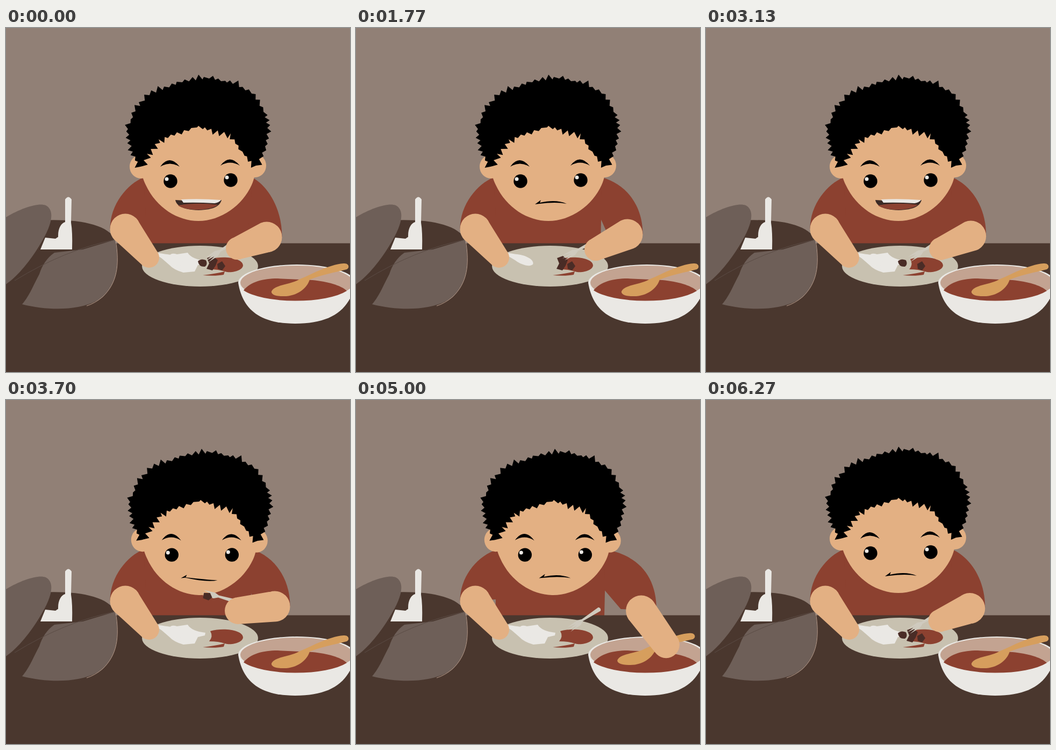
An HTML page that plays this animation: 640x640 px, repeating every 6310 ms.

```html
<!DOCTYPE html>
<html lang="en">
<head>
<meta charset="utf-8">
<title>Dinner time</title>
<style>
  html, body { margin: 0; width: 100%; height: 100%; overflow: hidden; background: #918076; }
  svg { display: block; width: 100vw; height: 100vh; }
  .skin { fill: #e3b083; }
  .red { fill: #8c4130; }
  .dark { fill: #4a372e; }
  .pot { fill: #6e5f58; }
  .white { fill: #eae8e4; }
  .wood { fill: #d69e5d; }
  .meat { fill: #4a2c26; }
</style>
</head>
<body>
<svg viewBox="0 0 640 640">
  <rect width="640" height="640" fill="#918076"/>
  <path id="torso" class="red" d="M256 275H458L455 402H252Z"/>
  <path id="sleeveL" class="red"/>
  <path id="sleeveR" class="red"/>
  <rect class="dark" y="400.5" width="640" height="240"/>

  <g id="head">
    <g class="skin">
      <ellipse cx="251" cy="258" rx="21" ry="22"/>
      <ellipse cx="463" cy="256" rx="21" ry="22"/>
      <path d="M262 160C246 240 248 268 260 292C280 335 320 359 358 359C400 359 440 330 457 292C469 266 466 230 450 160Z"/>
    </g>
    <path id="hair"/>
    <path id="brows" d="M287 258Q304 234 323 258Q305 247 287 258ZM399 256Q416 233 435 256Q417 245 399 256Z"/>
    <g id="eyes">
      <circle cx="306" cy="285" r="12.7"/><circle cx="418" cy="283" r="12.7"/>
      <circle class="white" cx="299" cy="281" r="3.5"/><circle class="white" cx="411" cy="278" r="3.5"/>
    </g>
    <path id="lips"/>
    <g id="smile">
      <path d="M315 320Q358 323 401 320C398 331 388 338 358 339C328 338 317 330 315 320Z" fill="#3b2a25"/>
      <path class="white" d="M326 319Q360 317 400 320Q396 325 388 326Q355 324 330 325Z"/>
      <path class="red" d="M320 330Q355 324 394 329C380 341 334 341 320 330Z"/>
    </g>
  </g>

  <path class="dark" d="M60 358C130 354 190 364 203 394L150 425H30Z"/>
  <path class="pot" d="M30 514C45 496 50 480 62 458Q70 432 90 418L143 412L203 394C212 440 206 475 180 500C150 525 85 528 30 514Z"/>
  <path d="M204 395C212 442 206 475 180 500Q166 512 150 517" fill="none" stroke="#b79c8c"/>
  <path d="M16 470Q110 412 203 394" fill="none" stroke="#5b4c45"/>
  <path class="pot" d="M-5 355C25 336 60 324 74 330C93 340 84 370 62 405C45 433 20 465-5 480Z"/>
  <path class="white" d="M64 412L73 390L92 392L98 388L123 411V412Z"/>
  <ellipse cx="361" cy="443" rx="108" ry="38" fill="#c8c1b0"/>

  <path class="red" d="M380 430C405 423 441 428 441 442C440 451 420 457 407 453Q396 449 378 449Q386 440 380 430ZM366 460Q390 457 407 453L405 459Q390 462 366 460Z"/>
  <path id="riceFull" class="white" d="M281 421L303 425Q307 417 318 421L338 418Q345 430 371 433L370 438L357 441L351 453L330 455Q312 450 303 440Z"/>
  <path id="riceLeft" class="white" d="M319 421L340 419Q344 431 357 437L351 446L332 444Q317 437 319 421Z"/>
  <path id="meatA" class="meat" d="M357 434Q363 428 372 432Q376 440 370 444Q359 445 357 434Z"/>
  <path id="meatB" class="meat" d="M374 428L385 424L394 432L390 442L384 451L373 448L378 438Z"/>
  <path id="meatC" class="meat" d="M393 439L402 434L408 443L402 451L394 448Z"/>

  <path id="spoon" class="white" d="M0-2L16-5C32-10 52-8 53 1C51 9 32 10 20 6L0 2Z"/>
  <g id="fork">
    <path d="M0-4Q4 0 0 4L-38 2L-46 6L-68 6L-52 3L-70 1L-52-1L-68-4L-46-5L-38-2Z" fill="#cfcabe"/>
    <path id="bite" class="meat" d="M-66 1L-55-2L-49 5L-54 12L-65 11Z"/>
  </g>
  <path id="taps" class="white" d="M345 402L351 397L368 414L363 419ZM375 381L383 379L390 404L386 406ZM412 381L420 380L416 408L410 408Z"/>

  <path class="white" d="M432 474A109 34 0 0 1 650 474C640 524 606 550 538 550C470 550 440 522 432 474Z"/>
  <ellipse cx="541" cy="474" rx="105" ry="32" fill="#c3a391"/>
  <path class="red" d="M442 488C455 472 478 466 505 466L570 469C598 472 622 478 634 489A105 32 0 0 1 442 488Z"/>
  <path id="ladle" class="wood" d="M494 490C500 477 528 478 545 468C565 460 600 440 628 438C638 437 640 446 634 449C610 455 585 460 565 468C560 485 540 500 515 499C500 499 493 495 494 490Z"/>
  <path id="spatula" class="white" d="M110 319Q116 310 122 319L121 362Q124 380 123 411H97V386C97 372 103 363 110 361Z"/>

  <path id="armL" class="skin"/>
  <path id="armR" class="skin"/>
</svg>
<script>
const LOOP = 6310;
const el = {};
document.querySelectorAll('[id]').forEach(e => el[e.id] = e);

const set = (id, d) => el[id].setAttribute('d', d);
const place = (id, ...ops) => el[id].setAttribute('transform', ops.join(' '));
const show = (id, on) => el[id].setAttribute('visibility', on ? 'visible' : 'hidden');
const shift = (x, y) => `translate(${x} ${y})`;
const turn = (deg, x = 0, y = 0) => `rotate(${deg} ${x} ${y})`;

const mix = (a, b, k) => a + (b - a) * k;
const mixPt = (p, q, k) => p.map((v, i) => mix(v, q[i], k));
const ramp = (t, a, b) => {
  const k = Math.min(1, Math.max(0, (t - a) / (b - a)));
  return k * k * (3 - 2 * k);
};
// Rises over a..b, holds, falls over c..d.
const bump = (t, a, b, c, d) => ramp(t, a, b) - ramp(t, c, d);
const arc = k => Math.sin(Math.PI * k);

// Hair: a smooth silhouette with seeded tufts along every edge.
function hairPath() {
  const rim = [[250, 258], [236, 230], [227, 188], [241, 155], [267, 125], [328, 101], [378, 94], [422, 104],
    [457, 122], [479, 156], [486, 186], [482, 220], [465, 256], [440, 230], [418, 196], [358, 182], [318, 194], [284, 207], [262, 234]];
  let seed = 7;
  const rand = () => (seed = seed * 16807 % 2147483647) / 2147483647;
  const pts = [];
  rim.forEach(([x, y], i) => {
    const [x2, y2] = rim[(i + 1) % rim.length];
    const len = Math.hypot(x2 - x, y2 - y);
    const ux = (x2 - x) / len, uy = (y2 - y) / len;
    const n = Math.round(len / 12);
    for (let j = 0; j < n; j++) {
      const s = j * len / n, tip = s + 3 + rand() * 5, h = 2 + rand() * 9;
      pts.push([x + ux * s, y + uy * s], [x + ux * tip + uy * h, y + uy * tip - ux * h]);
    }
  });
  return 'M' + pts.map(p => p.map(v => v.toFixed(1))).join('L') + 'Z';
}

const disc = ([x, y], r) => `M${x - r} ${y}a${r} ${r} 0 0 0 ${2 * r} 0a${r} ${r} 0 0 0 ${-2 * r} 0Z`;

// A forearm tapering from elbow to hand, and the sleeve above it (side -1 left, 1 right).
function drawArm(name, side, elbow, hand, fist, bodyX) {
  const R = 28.5;
  const [ex, ey] = elbow, [hx, hy] = hand;
  const len = Math.hypot(hx - ex, hy - ey) || 1;
  const nx = (hy - ey) / len, ny = (ex - hx) / len;
  set('arm' + name, disc(elbow, R) + disc(hand, fist) +
    `M${ex + nx * R} ${ey + ny * R}L${ex - nx * R} ${ey - ny * R}` +
    `L${hx - nx * fist} ${hy - ny * fist}L${hx + nx * fist} ${hy + ny * fist}Z`);
  const mid = 357 + bodyX, out = ex + side * R;
  set('sleeve' + name, `M${mid + side * 101} 278C${ex - side * 4} 290 ${out} 328 ${out} ${ey}` +
    `L${ex - side * 38} ${ey - 3}L${mid + side * 97} 352Z`);
}

const POT_GRIP = [116, 336], BOWL_GRIP = [584, 460];

function draw(t) {
  const within = (a, b) => t >= a && t < b;

  // What the boy is doing, each from 0 to 1.
  const bites = bump(t, 350, 700, 850, 1100) + bump(t, 1180, 1420, 1520, 1720);
  const meatBite = bites + bump(t, 3300, 3600, 3750, 4000);
  const reachL = bump(t, 1850, 2070, 2850, 3080);
  const pour = bump(t, 2150, 2450, 2560, 2820);
  const reachR = bump(t, 4560, 4850, 5850, 6150);
  const serve = bump(t, 4950, 5250, 5550, 5800);
  const pick = 1 - ramp(t, 350, 700) + bump(t, 2900, 3300, 3350, 3700) + ramp(t, 6200, LOOP);
  const tapping = within(4000, 4510);
  const tapLift = tapping ? Math.sin(Math.PI * (t - 4000) / 170) ** 2 : 0;
  const blink = bump(t, 4230, 4290, 4290, 4350) + bump(t, 1230, 1290, 1290, 1350);
  const lean = 7 * (reachR - reachL * (1 - pour));

  // Left arm, spoon and rice spatula
  const potting = reachL * (1 - pour);
  const eatL = mixPt([266, 427], [293, 384], bites);
  const handL = mixPt(eatL, POT_GRIP, potting);
  handL[1] -= 60 * arc(reachL) + 110 * arc(pour);
  const elbowL = mixPt(mixPt([222, 374], [211, 366], bites), [195, 362], potting);
  drawArm('L', -1, elbowL, handL, mix(19, 25, bites), lean);
  place('spoon', shift(eatL[0] + 14, eatL[1] - 7), turn(20 - 33 * bites));
  const carried = within(2070, 2850);
  place('spatula', ...carried
    ? [shift(handL[0] - POT_GRIP[0], handL[1] - POT_GRIP[1]), turn(-85 * pour, ...POT_GRIP)] : []);

  // Right arm, fork and ladle
  const eatR = mixPt(mixPt([446, 412], [430, 410], pick), [432, 392], meatBite);
  eatR[1] -= 6 * tapLift;
  const scoop = mixPt(BOWL_GRIP, [492, 444], serve);
  scoop[1] -= 15 * arc(serve);
  const handR = mixPt(eatR, scoop, reachR);
  const restElbow = mixPt(mixPt([505, 384], [485, 389], pick), [500, 384], meatBite);
  const elbowR = mixPt(restElbow, mixPt([532, 392], [514, 392], serve), reachR);
  drawArm('R', 1, elbowR, handR, mix(21, 25, Math.max(meatBite, reachR)), lean);
  const laid = Math.min(1, reachR * 3);
  place('fork', shift(eatR[0] + 7 * laid, eatR[1] - 16 - 7 * laid), turn(-27 - 6 * Math.max(pick, laid) + 43 * meatBite));
  place('ladle', shift(scoop[0] - BOWL_GRIP[0], scoop[1] - BOWL_GRIP[1]), turn(12 * serve, 588, 455));

  // Head and face
  const bow = Math.max(meatBite, Math.abs(lean) / 7);
  place('torso', shift(lean, 0));
  place('head', shift(lean + meatBite, 4 * bow), turn(meatBite + lean / 7, 358, 358));
  place('eyes', shift(0, 285 * .85 * blink), `scale(1 ${1 - .85 * blink})`);
  place('brows', shift(0, 10 * blink));
  const smiling = within(0, 450) || within(2900, 3380);
  const chewing = within(450, 1700) || within(3380, 3900);
  const k = chewing ? Math.cos(Math.PI * (t - 770) / 320) ** 2 : 0;
  const x = mix(333, 321, k);
  set('lips', `M${x} 328l11 ${2 * k - 8}l-2 5Q372 ${318 + 16 * k} 392 ${327 + 5 * k}Q372 ${323 + 16 * k} ${x + 8} 327Z`);
  show('smile', smiling);
  show('lips', !smiling);

  // Food
  const served = t >= 5330;
  show('riceFull', t < 420 || t >= 2480);
  show('riceLeft', within(420, 1170));
  show('meatA', t < 420 || within(2950, 3450) || served);
  show('meatB', t < 2950 || served);
  show('meatC', t < 3450 || served);
  show('bite', within(420, 900) || within(3450, 3720));
  show('taps', tapping && t > 4100 && tapLift < .35);
}

set('hair', hairPath());
const start = performance.now();
function frame() {
  draw((performance.now() - start) % LOOP);
  requestAnimationFrame(frame);
}
frame();
</script>
</body>
</html>
```
